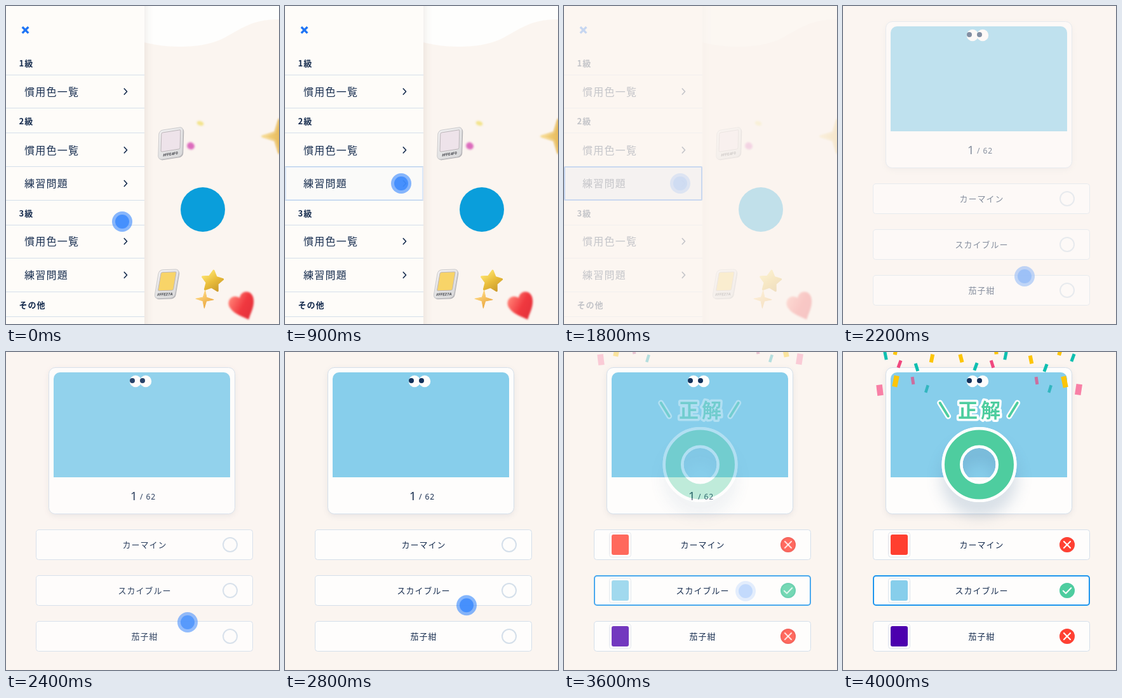
Recreate the animation shown at these times as an HTML page with a canvas. Size 430 by 500 pixels, loop 5600 ms.

```html
<!DOCTYPE html>
<html lang="ja">
<head>
<meta charset="utf-8">
<title>色の練習問題</title>
<style>
html, body { margin: 0; width: 100%; height: 100%; overflow: hidden; background: #fbf5f0; }
canvas { display: block; width: 430px; height: 500px; }
</style>
</head>
<body>
<canvas id="stage" width="430" height="500"></canvas>
<script>
const ctx = document.getElementById('stage').getContext('2d');
const LOOP = 5600, STEP = 100;
const BG = '#fbf5f0', WHITE = '#fefdfc', NAVY = '#172d4f', LINE = '#d4dfea';
const BLUE = '#3d8bfd', SKY = '#87ceeb', GREEN = '#4ecd9f', RED = '#ff4032';
const JP = '"Noto Sans CJK JP", "Noto Sans CJK", sans-serif';

const clamp = v => Math.max(0, Math.min(1, v));
const easeOut = u => 1 - Math.pow(1 - u, 1.75);
const easeInOut = u => u < 0.5 ? 2 * u * u : 1 - 2 * (1 - u) * (1 - u);
const span = (t, start, dur, ease) => ease(clamp((t - start) / dur));
const mix = (a, b, p) => a + (b - a) * p;

function paint(fill, stroke, width = 1) {
  if (fill) { ctx.fillStyle = fill; ctx.fill(); }
  if (stroke) { ctx.strokeStyle = stroke; ctx.lineWidth = width; ctx.stroke(); }
}

function box(x, y, w, h, r, fill, stroke, width) {
  ctx.beginPath();
  ctx.roundRect(x, y, w, h, r);
  paint(fill, stroke, width);
}

function disc(x, y, r, fill, stroke, width) {
  ctx.beginPath();
  ctx.arc(x, y, r, 0, Math.PI * 2);
  paint(fill, stroke, width);
}

function poly(points, stroke, width, cap = 'round') {
  ctx.beginPath();
  points.forEach(([x, y]) => ctx.lineTo(x, y));
  ctx.lineCap = cap;
  ctx.lineJoin = 'round';
  paint(null, stroke, width);
}

function text(str, x, y, size, weight, color, spacing = 0, align = 'left', family = JP) {
  ctx.font = `${weight} ${size}px ${family}`;
  ctx.letterSpacing = spacing + 'px';
  ctx.textAlign = align;
  ctx.fillStyle = color;
  ctx.fillText(str, x, y);
}

function scoped(draw) {
  ctx.save();
  draw();
  ctx.restore();
}

function withAlpha(a, draw) {
  if (a > 0) scoped(() => { ctx.globalAlpha = a; draw(); });
}

function shadow(color, blur, dy) {
  ctx.shadowColor = color;
  ctx.shadowBlur = blur;
  ctx.shadowOffsetY = dy;
}

function ramp(x0, y0, x1, y1, ...colors) {
  const g = ctx.createLinearGradient(x0, y0, x1, y1);
  colors.forEach((c, i) => g.addColorStop(i / (colors.length - 1), c));
  return g;
}

function veil(a) {
  withAlpha(a, () => { ctx.fillStyle = BG; ctx.fillRect(0, 0, 430, 500); });
}

function cross(x, y, r, color, width, cap) {
  poly([[x - r, y - r], [x + r, y + r]], color, width, cap);
  poly([[x + r, y - r], [x - r, y + r]], color, width, cap);
}

function pointer(x, y, alpha = 1) {
  withAlpha(alpha * 0.62, () => disc(x, y, 16, BLUE));
  withAlpha(alpha * 0.88, () => disc(x, y, 11, BLUE));
}

// ---- home page and menu ----

function chip(matrix, w, h, color, label) {
  scoped(() => {
    ctx.transform(...matrix);
    box(1.5, 1.5, w, h, 6, '#b4b3b6');
    box(0, 0, w, h, 6, ramp(0, 0, w, h, '#f1f0f1', '#d9d9da'), '#cccbcd', 1);
    box(4, 4, w - 8, h - 16, 2, color, '#bdb6ba', 1);
    text(label, w / 2, h - 4, 6, 700, '#45474d', 0, 'center', 'Roboto, sans-serif');
  });
}

function star(x, y, outer, inner, points, turn, fill, blur, join = 2) {
  scoped(() => {
    if (blur) ctx.filter = `blur(${blur}px)`;
    ctx.translate(x, y);
    ctx.rotate(turn);
    ctx.beginPath();
    for (let i = 0; i < points * 2; i++) {
      const r = i % 2 ? inner : outer, a = i * Math.PI / points - Math.PI / 2;
      ctx.lineTo(r * Math.cos(a), r * Math.sin(a));
    }
    ctx.closePath();
    ctx.lineJoin = 'round';
    paint(fill, fill, join);
  });
}

function heart() {
  scoped(() => {
    ctx.filter = 'blur(1.5px)';
    ctx.translate(373, 471);
    ctx.rotate(-0.4);
    ctx.beginPath();
    ctx.moveTo(0, -13);
    ctx.bezierCurveTo(7, -24, 22, -18, 20, -5);
    ctx.bezierCurveTo(18, 8, 6, 16, 0, 24);
    ctx.bezierCurveTo(-6, 16, -18, 8, -20, -5);
    ctx.bezierCurveTo(-22, -18, -7, -24, 0, -13);
    paint(ramp(-14, -16, 14, 18, '#ff7a70', '#f0383f', '#e2303a'));
  });
}

function blob(x, y, rx, ry, turn, color, blur) {
  scoped(() => {
    ctx.filter = `blur(${blur}px)`;
    ctx.beginPath();
    ctx.ellipse(x, y, rx, ry, turn, 0, Math.PI * 2);
    paint(color);
  });
}

function hero() {
  ctx.beginPath();
  ctx.moveTo(200, 0);
  ctx.lineTo(200, 52);
  ctx.bezierCurveTo(240, 66, 300, 70, 340, 52);
  ctx.bezierCurveTo(370, 37, 385, 21, 430, 21);
  ctx.lineTo(430, 0);
  paint('#fefefd');

  chip([1, -0.16, -0.03, 1, 241, 196], 38, 46, '#eee3ea', '#FFE4F0');
  chip([1, -0.04, -0.17, 1, 241, 415], 32, 45, '#f8d468', '#FFE27A');
  blob(291, 220, 6, 5.5, 0.5, '#dc6cbd', 1.6);
  blob(306, 184.5, 5.5, 3.5, 0.3, '#f3e48d', 1.8);
  star(430, 205, 27, 9, 4, 0, ramp(-25, 0, 10, 0, '#f6d98c', '#e2b04a'), 1.8);
  star(325, 433, 17, 9, 5, 0.12, ramp(-12, -14, 12, 14, '#ffe672', '#e9bd3b', '#c99a2c'), 0, 3);
  star(313, 461, 14, 4, 4, 0.05, ramp(-8, -10, 8, 10, '#ffd983', '#eaa63d'), 0.4, 1);
  heart();
  disc(310, 320, 35, '#0a9edb');
}

function menuItem(label, y) {
  text(label, 29, y + 6, 16, 400, NAVY, 1.28);
  poly([[186.3, y - 4.5], [190.5, y], [186.3, y + 4.5]], NAVY, 1.7);
}

function menu(press) {
  scoped(() => {
    shadow('rgba(120,100,80,0.16)', 14, 0);
    ctx.fillStyle = '#fefcf9';
    ctx.fillRect(0, -20, 218, 540);
  });
  ctx.fillStyle = LINE;
  [108, 160, 199, 252, 305, 344, 396, 449, 488].forEach(y => ctx.fillRect(0, y, 218, 1));
  withAlpha(press, () => box(1, 253, 216, 52, 1, '#e2ebf6', '#2a7ef2', 2));

  cross(30.5, 37.8, 4.8, '#1f75f5', 3.4, 'butt');
  [['1級', 90], ['2級', 181], ['3級', 326], ['その他', 470]]
    .forEach(([label, y]) => text(label, 20.5, y + 5, 13, 700, NAVY, 1.04));
  [['慣用色一覧', 134.5], ['慣用色一覧', 226.5], ['練習問題', 279], ['慣用色一覧', 370], ['練習問題', 423]]
    .forEach(([label, y]) => menuItem(label, y));
}

function home(t) {
  hero();
  menu(span(t, 850, 550, easeOut));
  pointer(183, mix(339, 279, span(t, 50, 450, easeInOut)));
  veil(span(t, 1520, 500, easeOut));
}

// ---- quiz ----

const choices = [
  ['カーマイン', 303, '#ff3f30', false],
  ['スカイブルー', 375, SKY, true],
  ['茄子紺', 447, '#4c00ae', false]
];

function card() {
  scoped(() => {
    shadow('rgba(90,110,140,0.12)', 10, 3);
    box(67.5, 24.5, 293, 230, 10, WHITE);
  });
  box(67.5, 24.5, 293, 230, 10, null, LINE, 1);
  box(75, 32, 278, 165, [10, 10, 0, 0], SKY);
  [204, 220].forEach(x => disc(x, 46, 9.2, WHITE));
  [199, 215].forEach(x => disc(x, 45, 4, '#12305a'));
  const face = '"Noto Sans", sans-serif';
  text('1', 196, 232.5, 18.5, 500, NAVY, 0, 'left', face);
  text('/ 62', 211, 231.5, 12, 500, NAVY, 0.9, 'left', face);
}

function choice([label, y, color, right], shown) {
  box(47.5, y - 23.5, 341, 47, 4, WHITE, LINE, 1);
  disc(353, y, 11, null, LINE, 2);
  text(label, 218.5, y + 5.3, 13, 500, NAVY, 1.04, 'center');
  withAlpha(shown, () => {
    if (right) box(48, y - 23, 340, 46, 4, null, '#1e96ee', 2);
    box(71.5, y - 19.5, 34, 39, 4, WHITE, '#dde4ec', 1);
    box(75, y - 16, 27, 32, 3, color);
    disc(353, y, 12, right ? GREEN : RED);
    if (right) poly([[346.8, y + 0.5], [351, y + 4.5], [359.3, y - 4]], '#fff', 2);
    else cross(353, y, 5, '#fff', 2.2);
  });
}

// kind: [width, height, colour]
const kinds = [
  [5, 12.5, '#0fbfb0'], [6, 13, '#fdc506'], [5, 12, '#f0487f'],
  [9.5, 17, '#f880a6'], [5, 12, '#cb6f9f'], [4.5, 12, '#33b6bf']
];
// x, y, kind, turn
const confetti = [
  [67, 6, 0, -0.2], [83, -2, 1, 0.2], [89, 19, 2, 0.35], [116, 24, 0, -0.3],
  [140, 10, 1, 0.2], [186, 10, 1, -0.25], [209, 23, 0, 0.35], [235, 19, 2, -0.3],
  [241, -3, 1, -0.1], [256, 6, 0, 0.2], [296, 12, 1, -0.2], [319, 25, 0, 0.35],
  [342, -1, 1, 0.3], [362, 9, 0, 0.35], [110, 45, 4, -0.15], [132, 58, 5, 0.3],
  [305, 45, 4, -0.15], [326, 58, 5, 0.3], [58, 60, 3, -0.12], [371, 59, 3, 0.15],
  [83, 46, 1, 0.2], [349, 47, 1, -0.2]
];

function rain(drop) {
  confetti.forEach(([x, y, kind, turn], i) => scoped(() => {
    const [w, h, color] = kinds[kind], k = i > 19 ? 1.35 : 1;
    ctx.translate(x, y + drop);
    ctx.rotate(turn);
    ctx.fillStyle = color;
    ctx.fillRect(-w * k / 2, -h * k / 2, w * k, h * k);
  }));
}

function praise() {
  const x = 214.5, y = 177;
  scoped(() => {
    shadow('rgba(70,110,150,0.22)', 24, 22);
    disc(x, y, 42.5, null, '#fff', 33);
  });
  disc(x, y, 42.5, null, '#fff', 33);
  disc(x, y, 42.5, null, GREEN, 24);
  [-1, 1].forEach(side => {
    const bar = [[x + side * 61, 80], [x + side * 48, 101]].map(([bx, by]) => [bx - 0.8, by]);
    poly(bar, '#fff', 9);
    poly(bar, GREEN, 4);
  });
  ctx.font = `700 31px ${JP}`;
  ctx.letterSpacing = '5px';
  ctx.textAlign = 'left';
  ctx.lineJoin = 'round';
  ctx.lineWidth = 7;
  ctx.strokeStyle = '#fff';
  ctx.strokeText('正解', 181, 103);
  ctx.fillStyle = GREEN;
  ctx.fillText('正解', 181, 103);
}

function quiz(t) {
  const shown = span(t, 3310, 500, easeOut);
  const cheer = span(t, 3490, 500, easeOut);
  card();
  choices.forEach(c => choice(c, shown));
  pointer(286, mix(425, 376, span(t, 2580, 420, easeInOut)), 1 - shown);
  if (cheer > 0) {
    // flatten the layer first so overlapping parts fade as one
    layer(cheer, praise);
    withAlpha(cheer, () => rain(-74 * (1 - cheer)));
  }
  veil(1 - span(t, 2030, 500, easeOut));
}

const sheet = new OffscreenCanvas(430, 500);
const main = ctx;
function layer(alpha, draw) {
  const off = sheet.getContext('2d');
  off.clearRect(0, 0, 430, 500);
  onto(off, draw);
  withAlpha(alpha, () => main.drawImage(sheet, 0, 0));
}

// runs a drawing routine against another context
function onto(target, draw) {
  const names = ['beginPath', 'arc', 'lineTo', 'fill', 'stroke', 'strokeText', 'fillText', 'save', 'restore'];
  const props = ['fillStyle', 'strokeStyle', 'lineWidth', 'lineCap', 'lineJoin', 'font', 'letterSpacing',
    'textAlign', 'shadowColor', 'shadowBlur', 'shadowOffsetY'];
  names.forEach(n => { main[n] = (...args) => target[n](...args); });
  props.forEach(p => Object.defineProperty(main, p, { configurable: true, set: v => { target[p] = v; } }));
  draw();
  [...names, ...props].forEach(n => { delete main[n]; });
}

function render(t) {
  ctx.fillStyle = BG;
  ctx.fillRect(0, 0, 430, 500);
  if (t < 2100) home(t);
  else if (t >= 2200) quiz(t);
}

const begin = performance.now();
function tick() {
  const t = (performance.now() - begin) % LOOP;
  render(Math.floor(t / STEP) * STEP);
  requestAnimationFrame(tick);
}
tick();
</script>
</body>
</html>
```
